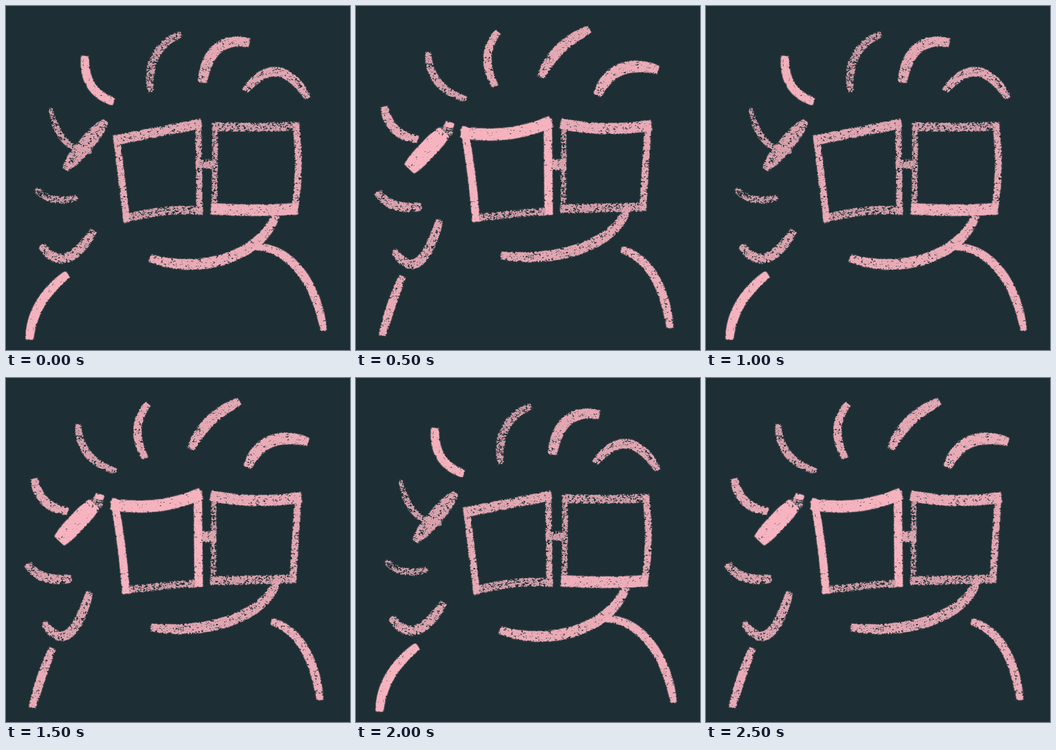
Write an HTML page with a canvas that moves like this. It is 748 px wide and 748 px high and loops after 3 s.

```html
<!DOCTYPE html>
<html lang="en">
<head>
<meta charset="utf-8">
<title>Chalk portrait</title>
<style>
  html, body { margin: 0; width: 100%; height: 100%; overflow: hidden; background: #1d2f34; }
  canvas { position: absolute; left: 0; top: 0; width: 748px; height: 748px; }
  canvas + canvas { opacity: 0; }
</style>
</head>
<body>
<script>
const SIZE = 748;
const CHALK = [247, 180, 192];
const clamp = v => Math.max(0, Math.min(1, v));

function makeContext() {
  const c = document.createElement('canvas');
  c.width = c.height = SIZE;
  return c.getContext('2d', { willReadFrequently: true });
}

function hash(x, y, seed) {
  let h = Math.imul(x, 374761393) + Math.imul(y, 668265263) + Math.imul(seed, 974634723);
  h = Math.imul(h ^ (h >>> 13), 1274126177);
  return ((h ^ (h >>> 16)) >>> 0) / 4294967296;
}

function noise(x, y, seed) {
  const ix = Math.floor(x), iy = Math.floor(y), fx = x - ix, fy = y - iy;
  const row = j => hash(ix, j, seed) * (1 - fx) + hash(ix + 1, j, seed) * fx;
  return row(iy) * (1 - fy) + row(iy + 1) * fy;
}

const grain = (x, y, seed) =>
  .65 * noise(x / 2.1, y / 1.7, seed) + .35 * noise(x / 4.4, y / 3.6, seed + 1);

// Ribbon around a path, narrowing towards both ends
function ribbon(d, width, taper) {
  const path = document.createElementNS('http://www.w3.org/2000/svg', 'path');
  path.setAttribute('d', d);
  const length = path.getTotalLength(), steps = 40, left = [], right = [];
  for (let i = 0; i <= steps; i++) {
    const t = i / steps, s = t * length;
    const p = path.getPointAtLength(s);
    const a = path.getPointAtLength(s - 1), b = path.getPointAtLength(s + 1);
    const dx = b.x - a.x, dy = b.y - a.y;
    const r = width / 2 * (1 - taper * Math.abs(2 * t - 1) ** 3) / Math.hypot(dx, dy);
    left.push([p.x - dy * r, p.y + dx * r]);
    right.unshift([p.x + dy * r, p.y - dx * r]);
  }
  return left.concat(right);
}

const mask = makeContext();
mask.filter = 'blur(1.7px)';

function rub(ink, seed, edge, density) {
  mask.clearRect(0, 0, SIZE, SIZE);
  mask.beginPath();
  edge.forEach(p => mask.lineTo(...p));
  mask.fill();

  const [x0, y0] = [0, 1].map(k => Math.floor(Math.min(...edge.map(p => p[k]))) - 5);
  const [x1, y1] = [0, 1].map(k => Math.ceil(Math.max(...edge.map(p => p[k]))) + 5);
  const { data } = mask.getImageData(x0, y0, x1 - x0, y1 - y0);
  for (let y = y0, i = 3; y < y1; y++) {
    for (let x = x0; x < x1; x++, i += 4) {
      const cover = data[i] / 255;
      if (cover < .03) continue;
      const limit = .3 + .55 * density - .28 * (1 - cover);
      const a = clamp(.5 + 4.5 * (limit - grain(x, y, seed)))
        * Math.min(1, cover * 1.6) * Math.min(1, .6 + .42 * density);
      ink[y * SIZE + x] = Math.max(ink[y * SIZE + x], a);
    }
  }
}

function drawPose(seed, sketch) {
  const ink = new Float32Array(SIZE * SIZE);
  const chalk = (path, width, density, taper = .3) =>
    rub(ink, seed++, ribbon(path, width, taper), density);

  // Four sides clockwise from the top left; a positive bow bends a side inwards
  const lens = (corners, widths, densities, bows) => corners.forEach(([x, y], i) => {
    const [u, v] = corners[(i + 1) % 4];
    const dx = u - x, dy = v - y, len = Math.hypot(dx, dy);
    const ex = 7 * dx / len, ey = 7 * dy / len, bend = 2 * bows[i] / len;
    const cx = (x + u) / 2 - dy * bend, cy = (y + v) / 2 + dx * bend;
    chalk(`M${x - ex} ${y - ey}Q${cx} ${cy} ${u + ex} ${v + ey}`, widths[i], densities[i], 0);
  });

  sketch(chalk, lens);

  const ctx = makeContext(), img = ctx.createImageData(SIZE, SIZE);
  ink.forEach((a, i) => img.data.set([...CHALK, a * 255], i * 4));
  ctx.putImageData(img, 0, 0);
  ctx.globalCompositeOperation = 'destination-over';
  ctx.fillStyle = '#1d2f34';
  ctx.fillRect(0, 0, SIZE, SIZE);
  document.body.append(ctx.canvas);
  return ctx.canvas;
}

drawPose(1, (chalk, lens) => {
  // hair
  chalk('M172 109Q167 186 234 208', 18, .9, .1);
  chalk('M315 187Q302 92 381 61', 18, .53);
  chalk('M427 166Q442 61 529 80', 23, .75, .2);
  chalk('M519 185Q592 94 657 200', 20, .7);
  chalk('M98 222Q105 277 141 304L186 318', 13, .54);
  chalk('M64 398Q100 434 156 416', 16, .5);
  chalk('M77 520Q126 592 191 488', 21, .67);
  // ear and back
  chalk('M128 355L217 250', 32, .64, .6);
  chalk('M51 725Q56 642 134 583', 20, .93, .2);
  // glasses
  lens([[241, 291], [418, 257], [421, 446], [262, 463]],
    [21, 13, 18, 14], [.72, .66, .55, .78], [0, 0, 8, 0]);
  lens([[455, 262], [630, 261], [627, 441], [453, 441]],
    [19, 14, 24, 12], [.55, .74, .85, .58], [2, -7, -3, 0]);
  chalk('M420 344H450', 20, .58, 0);
  // mouth and shoulder
  chalk('M313 548C400 580 545 560 587 455', 23, .8);
  chalk('M538 524C605 520 672 585 691 706', 18, .85);
});

const second = drawPose(101, (chalk, lens) => {
  // hair
  chalk('M157 100Q157 178 240 203', 16, .63);
  chalk('M309 56Q266 108 303 175', 17, .75, .2);
  chalk('M402 155Q431 85 508 51', 23, .76);
  chalk('M525 194Q559 110 657 139', 25, .8);
  chalk('M62 219Q70 281 135 290', 19, .76, .2);
  chalk('M47 403Q70 446 142 436', 20, .64, .2);
  chalk('M82 531Q138 616 182 465', 20, .68);
  // ear and back
  chalk('M116 354L192 274', 38, .97, .25);
  chalk('M189 277L207 263', 28, .45);
  chalk('M194 256L212 261', 11, .92, 0);
  chalk('M101 588Q73 655 57 717', 18, .78, .2);
  // glasses
  lens([[236, 273], [417, 252], [419, 447], [260, 462]],
    [25, 17, 16, 16], [.93, .93, .55, .92], [15, 0, 2, 3]);
  lens([[452, 256], [635, 259], [624, 437], [451, 441]],
    [23, 14, 19, 12], [.78, .75, .56, .5], [9, 0, 0, 0]);
  chalk('M426 345H457', 24, .72, 0);
  // mouth and shoulder
  chalk('M315 542C430 560 570 520 590 436', 23, .72);
  chalk('M577 529Q664 557 683 700', 18, .82, .2);
});

// Hard swap every half second
second.animate([
  { opacity: 0, offset: 0 }, { opacity: 0, offset: .5 },
  { opacity: 1, offset: .5 }, { opacity: 1, offset: 1 },
], { duration: 1000, iterations: Infinity, fill: 'both' }).startTime = 0;
</script>
</body>
</html>
```
